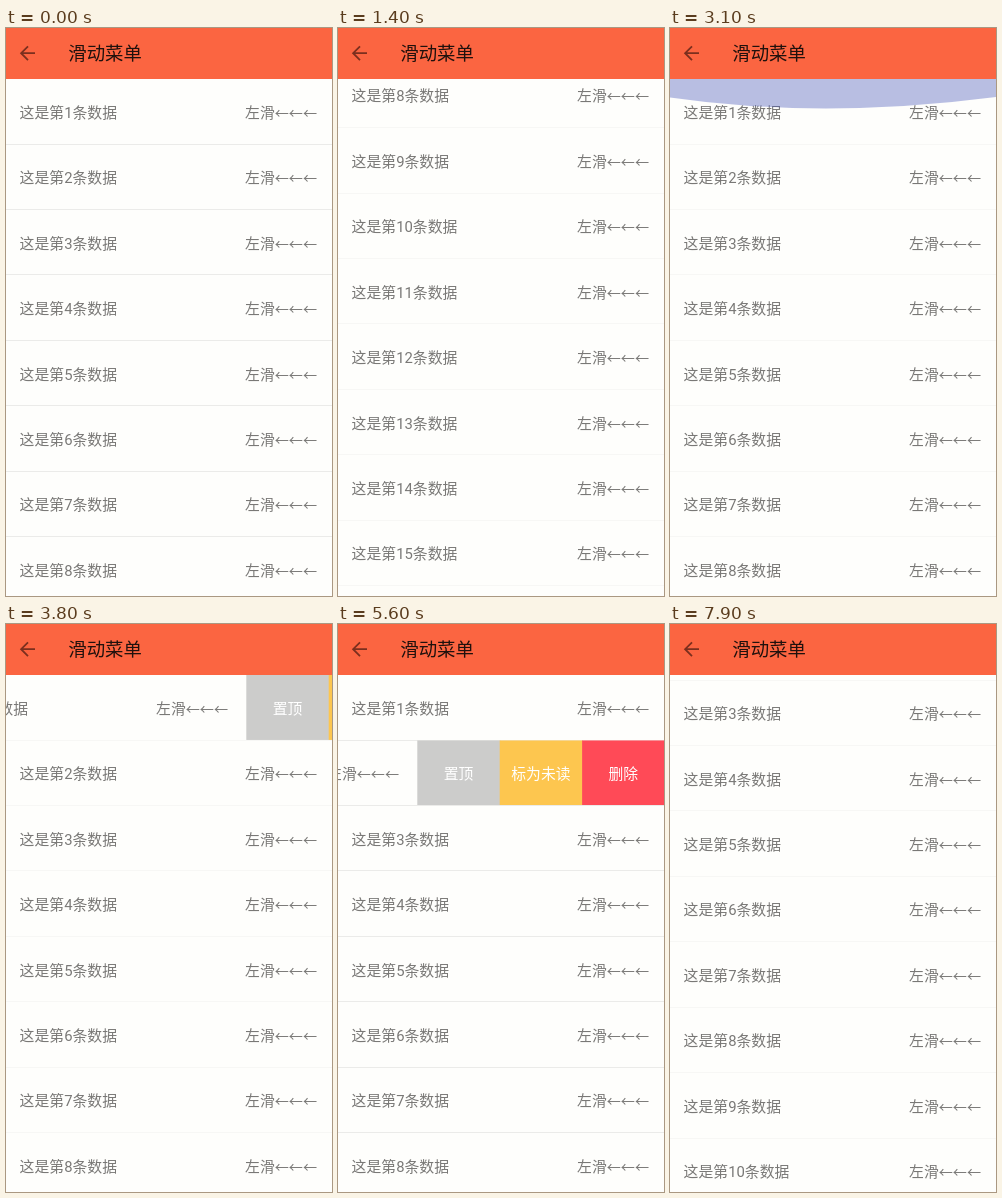
Write an HTML page with a canvas that moves like this. It is 326x568 px and loops after 8000 ms.

```html
<!DOCTYPE html>
<html lang="zh-CN">
<head>
<meta charset="utf-8">
<style>
  html, body { margin: 0; width: 100%; height: 100%; overflow: hidden; background: #fefefc; }
  canvas { display: block; }
</style>
</head>
<body>
<canvas id="stage" width="326" height="568"></canvas>
<script>
const W = 326, H = 568, LOOP = 8000, STEP = 100;
const BAR = 51, ROW = 65.45, ROWS = 30, BASELINE = 38.7;
const BUTTON = 82.4, OPEN = 250, MENU_GAP = 3.3;
const CJK = '"Noto Sans CJK SC", "Noto Sans CJK", sans-serif';
const LABEL = '14.85px Roboto, ' + CJK;
const HINT = '14.8px ' + CJK;
const ARROWS = '14.1px ' + CJK;
const INK = '#797876';
const ctx = document.getElementById('stage').getContext('2d');

const BUTTONS = [
  ['置顶', '#cccccb'],
  ['标为未读', '#fdc64f'],
  ['删除', '#ff4a57']
];

// Linear interpolation through [time, value] keys, held at both ends.
function track(keys, t) {
  if (t <= keys[0][0]) return keys[0][1];
  for (let i = 1; i < keys.length; i++) {
    const [t0, a] = keys[i - 1], [t1, b] = keys[i];
    if (t <= t1) return a + (b - a) * (t - t0) / (t1 - t0);
  }
  return keys[keys.length - 1][1];
}

const SCROLL = [
  [400, 0], [500, 18], [700, 150], [1000, 370], [1400, 474.6],
  [1600, 700], [1900, 1160], [2200, 1400], [2400, 1439.4],
  [2500, 1330], [2700, 800], [2900, 220], [3000, 0],
  [7700, 0], [7800, 45], [7900, 125.5]
];

const GLOW = [[2900, 0], [3000, 0.6], [3100, 1], [3200, 0.9], [3700, 0]];

const swipe = (start, first, end, close) => [
  [start, 0], [start + 100, first], [(start + end) / 2 + 50, 160], [end, OPEN],
  [close, OPEN], [close + 100, 168.5], [close + 300, 56], [close + 400, 0]
];

const SWIPES = [
  swipe(3600, 18, 4100, 4700),
  swipe(5200, 25, 5600, 5900),
  swipe(6500, 15, 7000, 7200)
];

function text(str, x, y, font, color, align = 'left') {
  ctx.font = font;
  ctx.fillStyle = color;
  ctx.textAlign = align;
  ctx.fillText(str, x, y);
}

function drawMenu(left, top) {
  BUTTONS.forEach(([label, color], i) => {
    const x = left + i * BUTTON;
    ctx.fillStyle = color;
    ctx.fillRect(x, top, BUTTON + 0.6, ROW - 0.5);
    text(label, x + BUTTON / 2, top + BASELINE, HINT, '#fff', 'center');
  });
}

function drawRow(index, top, shift, lineAlpha) {
  const y = top + BASELINE;
  text(`这是第${index + 1}条数据`, 13.6 - shift, y, LABEL, INK);
  text('左滑', 239.1 - shift, y, HINT, INK);
  text('←←←', 268.7 - shift, y, ARROWS, INK);
  if (shift > 0) drawMenu(W + MENU_GAP - shift, top);
  ctx.globalAlpha = lineAlpha;
  ctx.fillStyle = '#ebebe9';
  ctx.fillRect(0, Math.floor(top + ROW - 0.4), W, 1);
  ctx.globalAlpha = 1;
}

function drawGlow(amount) {
  if (amount <= 0) return;
  ctx.globalAlpha = 0.37 * Math.min(1, amount * 1.2);
  ctx.fillStyle = '#3f4fb5';
  ctx.beginPath();
  ctx.moveTo(0, BAR);
  ctx.lineTo(0, BAR + 18.5 * amount);
  ctx.quadraticCurveTo(152, BAR + 40.5 * amount, W, BAR + 18 * amount);
  ctx.lineTo(W, BAR);
  ctx.fill();
  ctx.globalAlpha = 1;
}

function drawBar() {
  ctx.fillStyle = '#fb6541';
  ctx.fillRect(0, 0, W, BAR);
  ctx.strokeStyle = '#7b2f1e';
  ctx.lineWidth = 1.8;
  ctx.beginPath();
  ctx.moveTo(29, 25.2);
  ctx.lineTo(15.5, 25.2);
  ctx.moveTo(22, 18.3);
  ctx.lineTo(15.1, 25.2);
  ctx.lineTo(22, 32.1);
  ctx.stroke();
  text('滑动菜单', 62.3, 32.2, '18.4px ' + CJK, '#20110d');
}

function draw(t) {
  const scroll = track(SCROLL, t);
  const still = t < 500 || (t >= 4100 && t < 7800);
  ctx.fillStyle = '#fefefc';
  ctx.fillRect(0, 0, W, H);
  for (let i = 0; i < ROWS; i++) {
    const top = BAR + i * ROW - scroll;
    if (top + ROW < BAR || top > H) continue;
    const shift = SWIPES[i] ? track(SWIPES[i], t) : 0;
    drawRow(i, top, shift, still ? 1 : 0.4);
  }
  drawGlow(track(GLOW, t));
  drawBar();
}

function frame() {
  const t = performance.now() % LOOP;
  draw(Math.floor(t / STEP) * STEP);
  requestAnimationFrame(frame);
}
frame();
</script>
</body>
</html>
```
